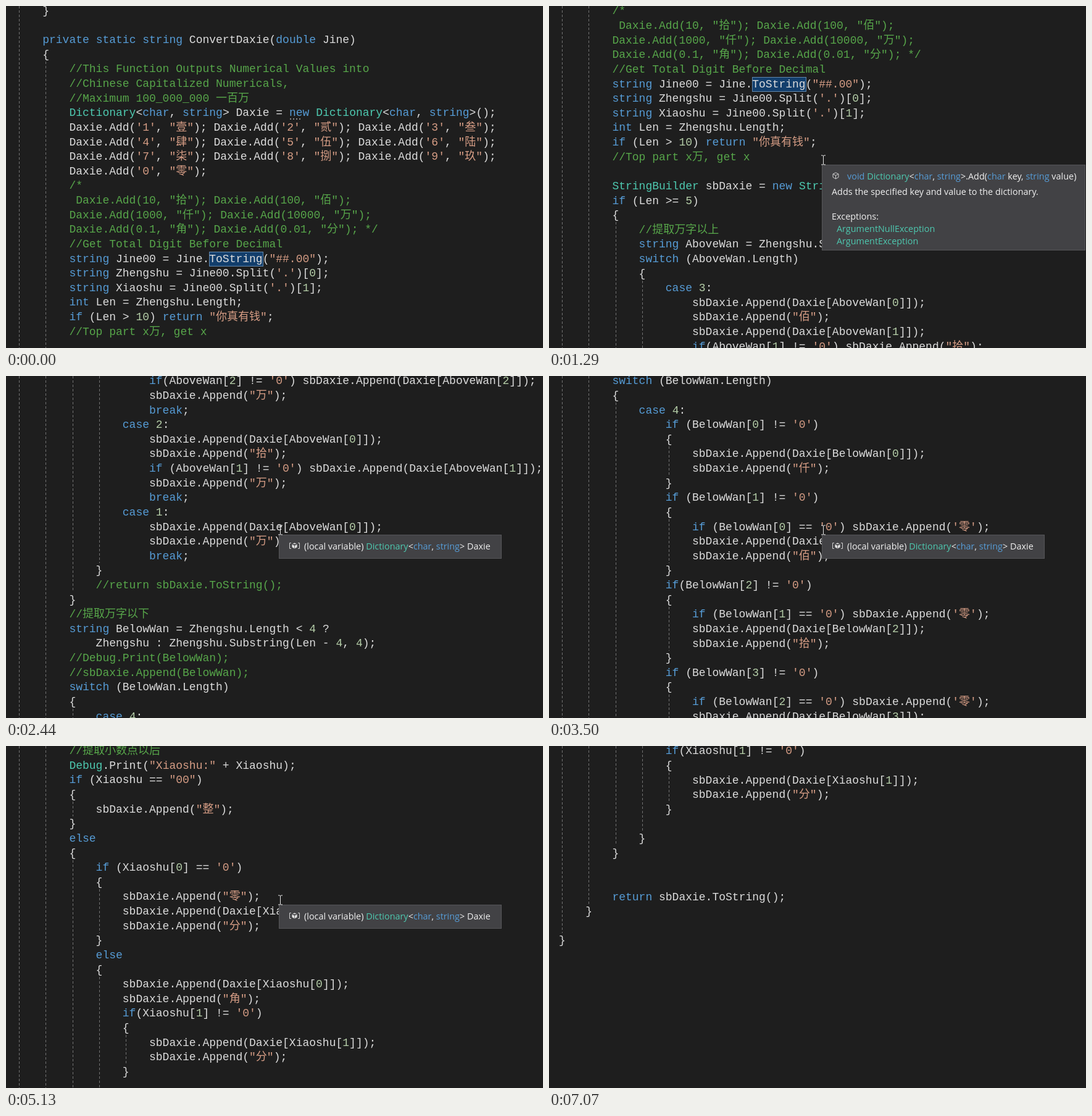
These frames come from a looping animation (870 by 554 pixels, 7.45 s). An HTML page:

```html
<!DOCTYPE html>
<html lang="zh-CN">
<head>
<meta charset="utf-8">
<style>
  html, body { margin: 0; width: 870px; height: 554px; overflow: hidden; background: #1e1e1e; }
  svg { display: block; }
  text { white-space: pre; fill: #dcdcdc; }
  .code { font: 18px "Liberation Mono", "Noto Sans CJK SC", "Noto Sans CJK", monospace; }
  .tip { font: 14.42px "Open Sans", "Noto Sans", sans-serif; }
  .tip text { fill: #f1f1f1; }
  .keyword { fill: #569cd6; }
  .type { fill: #4ec9b0; }
  .code .comment { fill: #57a64a; }
  .string { fill: #d69d85; }
  .number { fill: #b5cea8; }
  .guide { stroke: #717171; stroke-dasharray: 4 3; }
  .panel { fill: #424245; stroke: #555558; }
  .icon { fill: none; stroke: #d0d0d0; }
  .icon.solid { fill: #e0e0e0; stroke: #424245; stroke-width: 0.7; }
</style>
</head>
<body>
<svg id="stage" width="870" height="554" viewBox="0 0 870 554"></svg>
<script>
const LOOP = 7450, LINE = 23.62, CHAR = 10.8, LEFT = 16;

const source = `    }

    private static string ConvertDaxie(double Jine)
    {
        //This Function Outputs Numerical Values into
        //Chinese Capitalized Numericals,
        //Maximum 100_000_000 一百万
        Dictionary<char, string> Daxie = new Dictionary<char, string>();
        Daxie.Add('1', "壹"); Daxie.Add('2', "贰"); Daxie.Add('3', "叁");
        Daxie.Add('4', "肆"); Daxie.Add('5', "伍"); Daxie.Add('6', "陆");
        Daxie.Add('7', "柒"); Daxie.Add('8', "捌"); Daxie.Add('9', "玖");
        Daxie.Add('0', "零");
        /*
         Daxie.Add(10, "拾"); Daxie.Add(100, "佰");
        Daxie.Add(1000, "仟"); Daxie.Add(10000, "万");
        Daxie.Add(0.1, "角"); Daxie.Add(0.01, "分"); */
        //Get Total Digit Before Decimal
        string Jine00 = Jine.ToString("##.00");
        string Zhengshu = Jine00.Split('.')[0];
        string Xiaoshu = Jine00.Split('.')[1];
        int Len = Zhengshu.Length;
        if (Len > 10) return "你真有钱";
        //Top part x万, get x

        StringBuilder sbDaxie = new StringBuilder();
        if (Len >= 5)
        {
            //提取万字以上
            string AboveWan = Zhengshu.Substring(0, Len - 4);
            switch (AboveWan.Length)
            {
                case 3:
                    sbDaxie.Append(Daxie[AboveWan[0]]);
                    sbDaxie.Append("佰");
                    sbDaxie.Append(Daxie[AboveWan[1]]);
                    if(AboveWan[1] != '0') sbDaxie.Append("拾");
                    if(AboveWan[2] != '0') sbDaxie.Append(Daxie[AboveWan[2]]);
                    sbDaxie.Append("万");
                    break;
                case 2:
                    sbDaxie.Append(Daxie[AboveWan[0]]);
                    sbDaxie.Append("拾");
                    if (AboveWan[1] != '0') sbDaxie.Append(Daxie[AboveWan[1]]);
                    sbDaxie.Append("万");
                    break;
                case 1:
                    sbDaxie.Append(Daxie[AboveWan[0]]);
                    sbDaxie.Append("万");
                    break;
            }
            //return sbDaxie.ToString();
        }
        //提取万字以下
        string BelowWan = Zhengshu.Length < 4 ?
            Zhengshu : Zhengshu.Substring(Len - 4, 4);
        //Debug.Print(BelowWan);
        //sbDaxie.Append(BelowWan);
        switch (BelowWan.Length)
        {
            case 4:
                if (BelowWan[0] != '0')
                {
                    sbDaxie.Append(Daxie[BelowWan[0]]);
                    sbDaxie.Append("仟");
                }
                if (BelowWan[1] != '0')
                {
                    if (BelowWan[0] == '0') sbDaxie.Append('零');
                    sbDaxie.Append(Daxie[BelowWan[1]]);
                    sbDaxie.Append("佰");
                }
                if(BelowWan[2] != '0')
                {
                    if (BelowWan[1] == '0') sbDaxie.Append('零');
                    sbDaxie.Append(Daxie[BelowWan[2]]);
                    sbDaxie.Append("拾");
                }
                if (BelowWan[3] != '0')
                {
                    if (BelowWan[2] == '0') sbDaxie.Append('零');
                    sbDaxie.Append(Daxie[BelowWan[3]]);
                }
                break;
            case 3:
                sbDaxie.Append(Daxie[BelowWan[0]]);
                sbDaxie.Append("佰");
                sbDaxie.Append(Daxie[BelowWan[1]]);
                if (BelowWan[1] != '0') sbDaxie.Append("拾");
                if (BelowWan[2] != '0') sbDaxie.Append(Daxie[BelowWan[2]]);
                break;
            case 2:
                sbDaxie.Append(Daxie[BelowWan[0]]);
                sbDaxie.Append("拾");
                if (BelowWan[1] != '0') sbDaxie.Append(Daxie[BelowWan[1]]);
                break;
            case 1:
                sbDaxie.Append(Daxie[BelowWan[0]]);
                break;
        }
        sbDaxie.Append("元");


        //提取小数点以后
        Debug.Print("Xiaoshu:" + Xiaoshu);
        if (Xiaoshu == "00")
        {
            sbDaxie.Append("整");
        }
        else
        {
            if (Xiaoshu[0] == '0')
            {
                sbDaxie.Append("零");
                sbDaxie.Append(Daxie[Xiaoshu[1]]);
                sbDaxie.Append("分");
            }
            else
            {
                sbDaxie.Append(Daxie[Xiaoshu[0]]);
                sbDaxie.Append("角");
                if(Xiaoshu[1] != '0')
                {
                    sbDaxie.Append(Daxie[Xiaoshu[1]]);
                    sbDaxie.Append("分");
                }

            }
        }


        return sbDaxie.ToString();
    }

}`.split("\n");

// [time, first visible line]
const scrollSteps = [
  [0, 0], [810, 3], [1040, 6], [1290, 12], [1580, 15], [1660, 21], [1740, 24], [1830, 27], [1900, 30],
  [2130, 33], [2440, 36], [2520, 39], [2670, 42], [3060, 45], [3130, 51], [3500, 57], [3580, 60],
  [3890, 66], [3970, 72], [4280, 78], [4370, 84], [4670, 90], [4740, 96], [5130, 102], [5260, 105],
  [5570, 108], [5740, 114], [5910, 120]
];
const tipSteps = [[0, ""], [580, "brief"], [810, "full"], [1580, ""], [1960, "local"], [6500, ""]];

const stage = document.getElementById("stage");
const valueAt = (steps, t) => steps.findLast(([start]) => start <= t)[1];
const rowTop = row => row * LINE - 4;

function add(parent, tag, attrs = {}, content = "") {
  const node = document.createElementNS("http://www.w3.org/2000/svg", tag);
  for (const key in attrs) node.setAttribute(key, attrs[key]);
  node.textContent = content;
  return parent.appendChild(node);
}

const tokens = new RegExp([
  /(?<comment>\/\/.*)/, /(?<string>"[^"]*"|'[^']*')/,
  /(?<keyword>\b(?:private|static|string|double|char|int|new|if|else|return|switch|case|break|void)\b)/,
  /(?<type>\b(?:Dictionary|StringBuilder|Debug|Argument\w*Exception)\b)/, /(?<number>\b\d+\b)/
].map(r => r.source).join("|"), "g");

function addColored(parent, attrs, line) {
  const text = add(parent, "text", attrs);
  let end = 0;
  for (const match of line.matchAll(tokens)) {
    text.append(line.slice(end, match.index));
    const kind = Object.keys(match.groups).find(name => match.groups[name]);
    add(text, "tspan", { class: kind }, match[0]);
    end = match.index + match[0].length;
  }
  text.append(line.slice(end));
}

// Code, with block guides derived from the braces
const code = add(stage, "g", { class: "code" });
const guideLayer = add(stage, "g");
const guides = [];
const open = [-9, -6];
let inBlock = false;

source.forEach((raw, row) => {
  const line = raw.trimStart();
  const indent = raw.length - line.length;
  const x = LEFT + indent * CHAR;
  if (line === "{") open.push(row);
  if (line === "}") {
    const gx = Math.floor(x + 5.6) + 0.5;
    guides.push({ from: open.pop(), to: row, node: add(guideLayer, "line", { class: "guide", x1: gx, x2: gx }) });
  }
  const column = word => LEFT + raw.indexOf(word) * CHAR;
  if (line.includes("Jine.ToString"))
    add(code, "rect", { x: Math.floor(column("ToString")) + 0.5, y: Math.round(rowTop(row)) + 0.5,
      width: 87, height: 23, fill: "#123e6c", stroke: "#6388ad" });
  if (line.startsWith("Dictionary"))
    for (let i = 0; i < 4; i++)
      add(code, "rect", { x: Math.round(column("new")) + 1 + i * 5, y: Math.round(rowTop(row)) + 21,
        width: 2, height: 2, fill: "#8c8c8c" });
  inBlock ||= line.startsWith("/*");
  const attrs = { x, y: Math.round(13 + row * LINE) };
  if (inBlock) add(code, "text", { ...attrs, class: "comment" }, line);
  else if (line) addColored(code, attrs, line);
  if (line.endsWith("*/")) inBlock = false;
});

// Tooltips
function addTip(width, height, rows) {
  const tip = add(stage, "g", { class: "tip" });
  add(tip, "rect", { class: "panel", x: 442.5, y: 257.5, width, height });
  rows.forEach(([x, y, line]) => addColored(tip, { x, y }, line));
  return tip;
}
function addCube(tip, x, y, kind = "") {
  add(tip, "path", { class: "icon " + kind,
    d: `M${x} ${y - 5}l4.5 2.2v5.2l-4.5 2.6l-4.5-2.6v-5.2zm-4.5 2.2l4.5 2.3l4.5-2.3m-4.5 2.3v5.2` });
}
const signature = [
  [483, 281, "void Dictionary<char, string>.Add(char key, string value)"],
  [458, 306, "Adds the specified key and value to the dictionary."]
];
const tips = {
  brief: addTip(426, 58, signature),
  full: addTip(426, 138, [...signature, [458, 346, "Exceptions:"],
    [466, 366, "ArgumentNullException"], [466, 386, "ArgumentException"]]),
  local: addTip(360, 38, [[483, 281, "(local variable) Dictionary<char, string> Daxie"]])
};
addCube(tips.brief, 464.5, 275);
addCube(tips.full, 464.5, 275);
addCube(tips.local, 467.5, 275, "solid");
add(tips.local, "path", { class: "icon", d: "M462 270.5h-2.5v9h2.5M473 270.5h2.5v9h-2.5" });

const pointer = add(stage, "path", { fill: "none", stroke: "#e8e8e8",
  d: "M-3.5 -7.5h2.5l1 1l1 -1h2.5M-3.5 7.5h2.5l1 -1l1 1h2.5M0 -6.5v13" });

function pointerAt(t) {
  const glide = (from, to, p) => from.map((v, i) => Math.round(v + (to[i] - v) * p) + 0.5);
  const rest = [444, 249];
  if (t < 70 || t >= 7070) return null;
  if (t < 500) {
    const p = Math.min(4, Math.floor((t - 70) / 72.5)) / 4;
    return glide([741, 503], [518, 238], p);
  }
  if (t < 6500) return glide(rest, rest, 0);
  return glide(rest, [700, 533], (Math.floor((t - 6500) / 81.5) + 1) / 7);
}

function render(t) {
  const top = valueAt(scrollSteps, t);
  code.setAttribute("transform", `translate(0 ${-Math.round(top * LINE)})`);
  for (const { from, to, node } of guides) {
    const y1 = Math.max(0, Math.round(rowTop(from + 1 - top)));
    const y2 = Math.min(554, Math.round(rowTop(to - top)));
    node.setAttribute("y1", y1);
    node.setAttribute("y2", y2);
    node.style.display = y2 > y1 ? "" : "none";
  }
  const shown = valueAt(tipSteps, t);
  for (const name in tips) tips[name].style.display = name === shown ? "" : "none";
  const spot = pointerAt(t);
  pointer.style.display = spot ? "" : "none";
  if (spot) pointer.setAttribute("transform", `translate(${spot})`);
}

const begin = performance.now();
function tick() {
  render((performance.now() - begin) % LOOP);
  requestAnimationFrame(tick);
}
tick();
</script>
</body>
</html>
```
